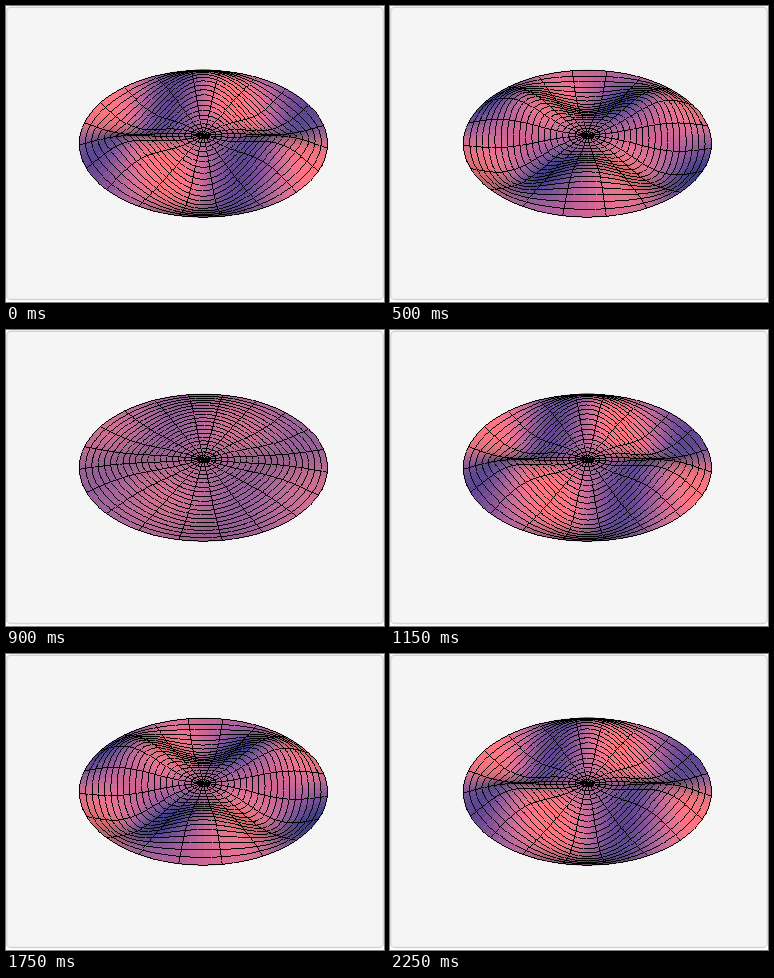
Recreate the animation shown at these times as an HTML page with a canvas. Size 378 by 296 pixels, loop 2300 ms.

```html
<!DOCTYPE html>
<html lang="en">
<head>
<meta charset="utf-8">
<title>Vibrating membrane</title>
<style>
  html, body { margin: 0; width: 100%; height: 100%; overflow: hidden; background: #fff; }
  canvas { display: block; }
</style>
</head>
<body>
<canvas id="stage" width="378" height="296"></canvas>
<script>
const ctx = document.getElementById('stage').getContext('2d');

const STEP = 50, STEPS = 46, PERIOD = 22.5;
const RINGS = 20, SPOKES = 20, FINE = 5, SIDES = SPOKES * FINE;
const TURN = 7.8 * Math.PI / 180;
const ROOT = 6.3802, HEIGHT = 0.335;      // first zero of J3, amplitude
const CX = 197.4, CY = 129.2, SCALE = 123.2;  // camera
const SIN = 0.588, COS = 0.809, DIST = 7;

function bessel(n, x) {
  let term = 1, sum = 0;
  for (let i = 1; i <= n; i++) term *= x / 2 / i;
  for (let m = 0; m < 22; m++) {
    sum += term;
    term *= -x * x / 4 / ((m + 1) * (m + 1 + n));
  }
  return sum;
}

const radial = Array.from({ length: RINGS + 1 }, (_, i) => {
  const x = ROOT * i / RINGS;
  return { r: i / RINGS, j2: bessel(2, x), j3: bessel(3, x), j4: bessel(4, x) };
});

function project(x, y, z) {
  const w = 1 - (COS * y + SIN * z) / DIST;
  return [CX + SCALE * x / w, CY + SCALE * (SIN * y - COS * z) / w];
}

// Coloured lights on a surface leaning to the right and to the viewer
function shade(right, near) {
  const norm = Math.hypot(1, right, near);
  return [
    60 + Math.max(0, 112 + 165 * right + 95 * near) / norm,
    (102 + 48 * right + 26 * near) / norm,
    (148 - 22 * right + 42 * near) / norm
  ];
}

function vertex(i, j, amp) {
  const { r, j2, j3, j4 } = radial[i];
  const a = TURN + 2 * Math.PI * j / SIDES;
  const k = amp * ROOT / 2;
  const right = k * (j2 * Math.sin(2 * a) - j4 * Math.sin(4 * a));
  const near = -k * (j2 * Math.cos(2 * a) + j4 * Math.cos(4 * a));
  return {
    p: project(r * Math.cos(a), -r * Math.sin(a), -amp * j3 * Math.sin(3 * a)),
    c: shade(right, near)
  };
}

// Crisp one-pixel line
function line(a, b) {
  const dx = b[0] - a[0], dy = b[1] - a[1];
  const n = Math.max(1, Math.round(Math.max(Math.abs(dx), Math.abs(dy))));
  for (let k = 0; k <= n; k++)
    ctx.fillRect(Math.floor(a[0] + dx * k / n), Math.floor(a[1] + dy * k / n), 1, 1);
}

function fillCell(corners) {
  const color = [0, 1, 2].map(k =>
    Math.min(255, Math.round(corners.reduce((sum, v) => sum + v.c[k], 0) / 4)));
  ctx.fillStyle = ctx.strokeStyle = `rgb(${color})`;
  ctx.beginPath();
  for (const v of corners) ctx.lineTo(...v.p);
  ctx.closePath();
  ctx.fill();
  ctx.stroke();
}

function drawPanel() {
  ctx.fillStyle = '#fff';
  ctx.fillRect(0, 0, 378, 296);
  ctx.beginPath();
  ctx.roundRect(0.75, 1.25, 376.5, 292.25, 4);
  ctx.fillStyle = '#f5f5f5';
  ctx.fill();
  ctx.strokeStyle = '#d4d4d4';
  ctx.lineWidth = 1.3;
  ctx.stroke();
}

function draw(step) {
  const amp = HEIGHT * Math.cos(2 * Math.PI * step / PERIOD);
  const grid = radial.map((_, i) =>
    Array.from({ length: SIDES }, (_, j) => vertex(i, j, amp)));

  drawPanel();
  ctx.lineWidth = 0.7;
  for (let i = 0; i < RINGS; i++)
    for (let j = 0; j < SIDES; j++) {
      const n = (j + 1) % SIDES;
      fillCell([grid[i][j], grid[i][n], grid[i + 1][n], grid[i + 1][j]]);
    }

  ctx.fillStyle = '#000';
  for (let i = 0; i < RINGS; i++)
    for (let j = 0; j < SIDES; j++) {
      const outer = grid[i + 1];
      line(outer[j].p, outer[(j + 1) % SIDES].p);
      if (j % FINE === 0) line(grid[i][j].p, outer[j].p);
    }
}

let shown = -1;
const start = performance.now();
function tick() {
  const step = Math.floor((performance.now() - start) / STEP) % STEPS;
  if (step !== shown) draw(shown = step);
  requestAnimationFrame(tick);
}
tick();
</script>
</body>
</html>
```
